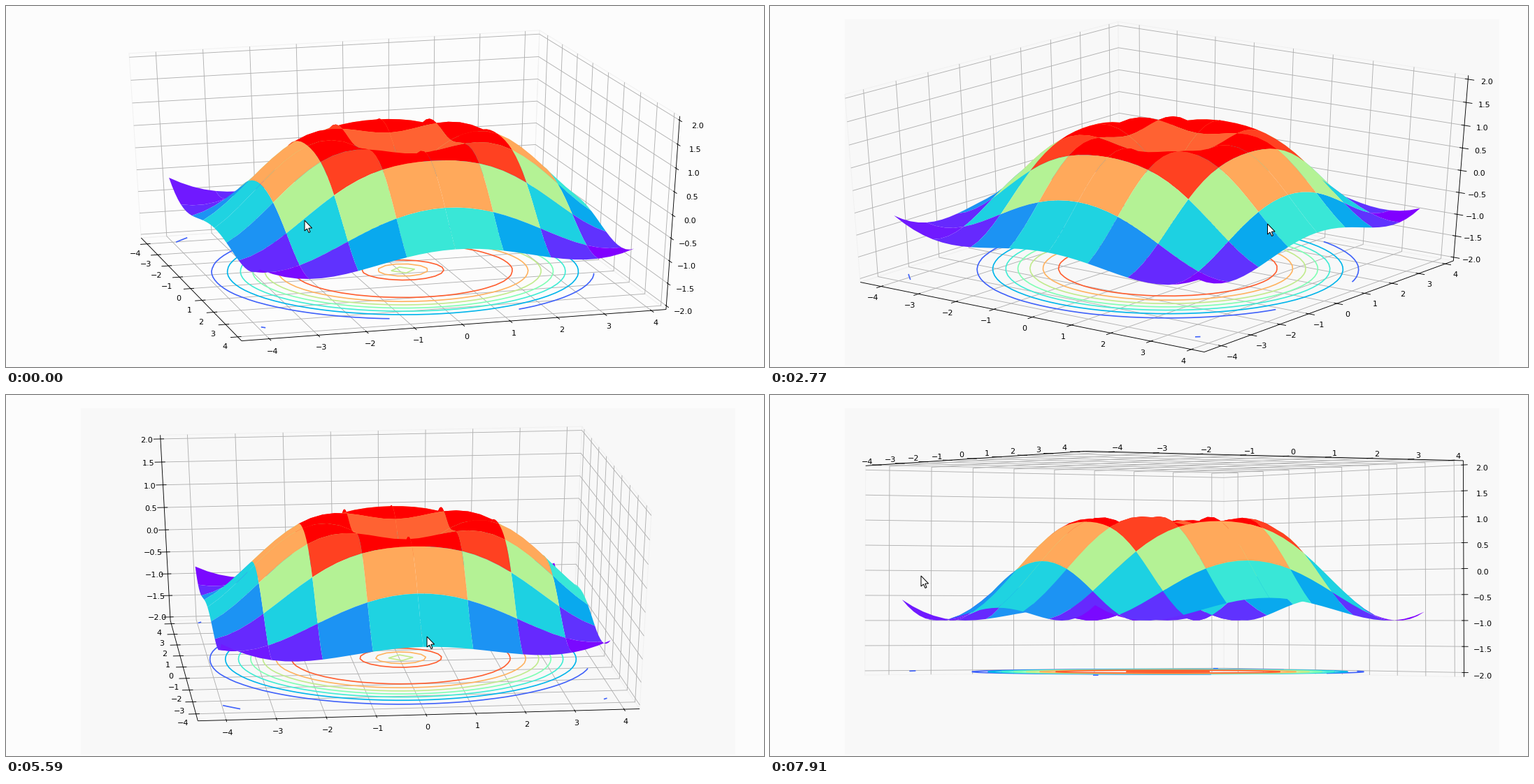
Write a matplotlib script that moves like this. It is 1084 px wide and 517 px high and loops after 8 s.

```python
import numpy as np
import matplotlib.pyplot as plt
from matplotlib.animation import FuncAnimation
from matplotlib.collections import LineCollection, PolyCollection
from matplotlib.patches import Polygon, Rectangle

W, H, DPI = 1084, 517, 64
INTERVAL, FRAMES = 40, 200
STEP_MS = 141                      # the view is redrawn this often
PT = 72 / DPI                      # points per pixel
RAINBOW = plt.get_cmap("rainbow")

# Camera: screen centre, stretch and distance; the data box is a unit cube.
CX, CY, SX, SY, DIST = 557, 249.8, 5960, 2925, 10
MID = np.array([-0.125, -0.125, 0.0])
SPAN = np.array([8.525, 8.525, 4.0])
HALF = 0.5 + 1 / 48                # walls stand a little outside the limits
TICK = 2 * HALF / 12
LABEL_GAP = 0.0315

# Where the drag turns: step, azimuth, elevation, pointer x and y
KEYS = np.array([
    (0, -16, 27.5, 427, 307),
    (6, -6.7, 24, 396, 300),
    (14, -34.8, 30.5, 618, 319),
    (24, -71.3, 27, 805, 305),
    (30, -74.5, 25, 724, 321),
    (39, -96.3, 26, 602, 346),
    (47, -66.7, 19, 341, 296),
    (54, -33.5, -1.2, 244, 267),
    (56, -32, -1.4, 216, 259),
])

TICKS = [np.arange(-4, 5), np.arange(-4, 5), np.arange(-2, 2.1, 0.5)]
# For each axis: the direction its ticks point in, and the remaining one
SIDES = [(1, 2), (0, 2), (0, 1)]


def to_box(points):
    return (np.asarray(points, float) - MID) / SPAN


def camera(azim, elev):
    a, e = np.radians([azim, elev])
    right = np.array([-np.sin(a), np.cos(a), 0])
    toward = np.array([np.cos(e) * np.cos(a), np.cos(e) * np.sin(a), np.sin(e)])
    return right, np.cross(toward, right), toward


def project(points, view):
    right, up, toward = view
    points = np.asarray(points)
    depth = DIST - points @ toward
    xy = np.stack([CX + SX * (points @ right) / depth,
                   CY - SY * (points @ up) / depth], axis=-1)
    return xy, depth


def with_value(point, axis, value):
    moved = np.array(point, float)
    moved[axis] = value
    return moved


def flipped(point, axis):
    return with_value(point, axis, -point[axis])


def make_surface(x, y, z, stride=4):
    """Perimeters of square blocks of the surface, and their mean heights."""
    grid = np.stack([x, y, z], axis=-1)
    last = len(x) - 1
    cuts = list(range(0, last, stride)) + [last]
    patches = []
    for r0, r1 in zip(cuts, cuts[1:]):
        for c0, c1 in zip(cuts, cuts[1:]):
            patches.append(np.concatenate([
                grid[r0, c0:c1], grid[r0:r1, c1],
                grid[r1, c1:c0:-1], grid[r1:r0:-1, c0]]))
    return patches, np.array([p[:, 2].mean() for p in patches])


fig = plt.figure(figsize=(W / DPI, H / DPI), dpi=DPI, facecolor="#fcfcfc")
ax = fig.add_axes([0, 0, 1, 1])

samples = np.arange(-4, 4, 0.25)
X, Y = np.meshgrid(samples, samples)
Z = np.sin(np.hypot(X, Y))

patches, heights = make_surface(X, Y, Z)
patches = [to_box(p) for p in patches]
patch_colors = RAINBOW((heights - heights.min()) / np.ptp(heights))

levels = np.linspace(-1, 1, 9)
contours = ax.contour(X, Y, Z, levels=levels)
rings, ring_colors = [], []
for level, segments in zip(levels, contours.allsegs):
    for seg in segments:
        if len(seg) > 1:
            rings.append(to_box(np.column_stack([seg, np.full(len(seg), -2.0)])))
            ring_colors.append(RAINBOW((level + 1) / 2))

ax.clear()
ax.set(xlim=(0, W), ylim=(H, 0))
ax.axis("off")


def add_lines(color, width, zorder):
    return ax.add_collection(
        LineCollection([], colors=color, linewidths=width * PT, zorder=zorder),
        autolim=False)


panel = ax.add_patch(Rectangle((107, 19), 936, 496, color="#f8f8f8", lw=0,
                               zorder=0))
pane_edges = add_lines("#f0f0f0", 0.9, 1)
grid_lines = add_lines("#b0b0b0", 0.9, 2)
axis_lines = add_lines("black", 0.9, 3)
ring_lines = add_lines(ring_colors, 1.67, 4)
surface = ax.add_collection(PolyCollection([], edgecolors="none", zorder=5),
                            autolim=False)
arrow = np.array([(0, 0), (0, 15), (3.5, 12), (6, 17.5), (8, 16.5),
                  (5.8, 11.2), (10.6, 11)])
pointer = ax.add_patch(Polygon(arrow, fc="white", ec="black", lw=PT, zorder=7))


def tick_text(axis, value):
    text = f"{value:.1f}" if axis == 2 else f"{value:.0f}"
    return text.replace("-", "\u2212")


labels = [[ax.text(0, 0, tick_text(i, v), fontsize=11.1 * PT, ha="center",
                   va="top", family="DejaVu Sans", zorder=3)
           for v in TICKS[i]] for i in range(3)]


def draw_frame_box(view):
    back = np.where(view[2] < 0, HALF, -HALF)
    panes, grid, lines = [], [], []
    for i, (side, other) in enumerate(SIDES):
        corner = flipped(back, side)
        panes.append([back, corner, flipped(corner, other),
                      flipped(back, other), back])
        lines.append([with_value(corner, i, -HALF), with_value(corner, i, HALF)])
        outward = np.sign(corner[side])
        for value, label in zip(TICKS[i], labels[i]):
            t = (value - MID[i]) / SPAN[i]
            wall, pos = with_value(back, i, t), with_value(corner, i, t)
            grid.append([flipped(wall, side), wall, flipped(wall, other)])
            lines.append([
                with_value(pos, side, pos[side] + 0.2 * TICK * outward),
                with_value(pos, side, pos[side] - 0.1 * TICK * outward)])
            shift = with_value(np.sign(pos), i, 0) * LABEL_GAP
            label.set_position(project(pos + shift, view)[0])
    for artist, paths in ((pane_edges, panes), (grid_lines, grid),
                          (axis_lines, lines)):
        artist.set_segments(project(paths, view)[0])


def draw_surface(view):
    shapes = [project(p, view) for p in patches]
    order = np.argsort([-depth.mean() for _, depth in shapes])
    surface.set_verts([shapes[k][0] for k in order])
    surface.set_facecolor(patch_colors[order])


def update(frame):
    # A frame shows the state near its end, so changes are never late
    step = (frame * INTERVAL + 30) // STEP_MS
    azim, elev, px, py = [np.interp(step, KEYS[:, 0], column)
                          for column in KEYS[:, 1:].T]
    view = camera(azim, elev)
    draw_frame_box(view)
    ring_lines.set_segments([project(r, view)[0] for r in rings])
    draw_surface(view)
    pointer.set_xy(arrow + (px, py))
    panel.set_visible(step > 0)
    return []


anim = FuncAnimation(fig, update, frames=FRAMES, interval=INTERVAL,
                     init_func=lambda: update(0), repeat=True, repeat_delay=0)
plt.show()
```
